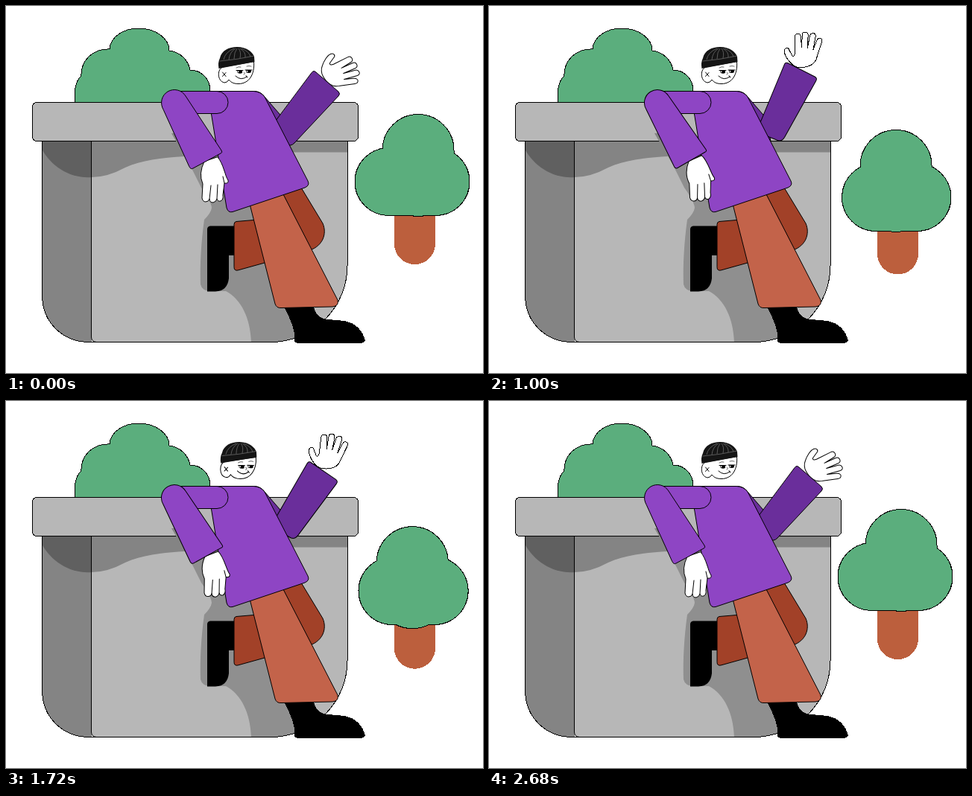
These frames come from a looping animation (640x493 px, 2.72 s). An HTML page:

```html
<!DOCTYPE html>
<html lang="en">
<head>
<meta charset="utf-8">
<title>Waving by the planter</title>
<style>
  html, body { margin: 0; width: 100%; height: 100%; overflow: hidden; background: #fff; }
  svg { display: block; width: 100%; height: 100%; }
  .line { stroke: #000; stroke-width: 1; stroke-linejoin: round; stroke-linecap: round; }
  .crisp { shape-rendering: crispEdges; }
</style>
</head>
<body>
<svg viewBox="0 0 640 493">
  <defs>
    <g id="crown">
      <rect id="leftLobe" width="125" height="90" rx="45"/>
      <rect id="rightLobe" width="125" height="90" rx="45"/>
      <rect id="topLobe" width="95" height="136" rx="47.500"/>
    </g>
    <path id="pot" d="M48.500 181V388C48.500 425 76 451.500 112 451.500H355A103 103 0 0 0 458 348.500V181Z"/>
    <clipPath id="potClip"><use href="#pot"/></clipPath>
  </defs>

  <!-- tree -->
  <g class="crisp">
    <rect id="trunk" x="521" width="55" height="110" rx="27.500" fill="#bc5f3d"/>
    <use href="#crown" fill="#000" stroke="#000" stroke-width="2"/>
    <use href="#crown" fill="#5bae7d"/>
  </g>

  <!-- bush and planter -->
  <path class="line crisp" fill="#5bae7d" d="M92 130V119C92 108 96 98 101 94C100 73 117 57 139 58C140 41 158 30 178 30C200 30 219 43 219 60C233 62 244 71 247 86C262 86 274 98 274 114V130Z"/>
  <g clip-path="url(#potClip)">
    <rect x="48" y="181" width="67" height="271" fill="#848484"/>
    <path fill="#606060" d="M48 181H115V230C86 232 61 216 48 192Z"/>
    <path fill="#b7b7b7" d="M114.500 181H459V452H121Q114.500 452 114.500 445Z"/>
    <path fill="#848484" d="M115 181H459V196.500H300L240 202C208 204 182 207 160 217Q136 230 115 230Z"/>
    <path fill="#8f8f8f" d="M235 190L262 244Q275 262 276 271Q275 278 266 287C262 315 260 350 261 374Q263 383 275 383H295C316 394 328 420 329 452H400L380 350L300 190Z"/>
    <path class="line" fill="none" d="M114.500 181V445Q115 451 121 451.500"/>
  </g>
  <use href="#pot" class="line crisp" fill="none"/>
  <rect class="line crisp" x="35.500" y="129.500" width="437" height="52" rx="6" fill="#b7b7b7"/>
  <path fill="#848484" d="M222 171L232 170L255 216L249 217Z"/>

  <!-- waving arm -->
  <path class="line" fill="#6a2e9b" d="M334 114.500Q342 115 347 122L373 152L378 182L360 155Z"/>
  <g id="arm">
    <g id="hand">
      <path class="line crisp" fill="#fff" d="M-13 10C-17 6 -22 -2 -21.500 -7C-21 -12 -16 -12 -15 -8L-11 0Q-8 1 -7.500 -4L-7 -25C-7 -31 1 -31 1 -26L2 -11L3 -27C3 -33 11 -33 11 -27L9.500 -10L13 -25C14 -31 22 -31 21 -25L17 -7L22 -19C25 -26 31 -22 29 -17L22 2C20 12 10 16 0 16Q-8 16 -13 10Z"/>
    </g>
    <path class="line" fill="#6a2e9b" d="M410.500 89Q413 86 416 89L446 115Q449 118 446 121L387 184Q382 189 377 186L352 168Z"/>
  </g>

  <!-- legs -->
  <g id="foot"><path d="M270 330H299V366Q297 383 281 383.500H270Z"/></g>
  <path d="M274 295.500H310V335H299L292 348H270V300Q270 296 274 295.500Z"/>
  <path class="line" fill="#a24128" d="M306 293Q306 290 309 289.500L350 286L385 282L370 250L396 244L425 292C431 306 425 322 408 328L311 355Q306 356 306 351Z"/>
  <path class="crisp" d="M373 404H413Q416 420 432 421L455 423C470 426 479 437 482 449Q481 452 478 452.500H390Q386 452 387.500 446Q387 430 373 404Z"/>
  <path class="line" fill="#c3634a" d="M326 262L361 400Q363 406 369 405.500L438 404Q447 403 445 395L371 251Z"/>

  <!-- torso and resting arm -->
  <path class="line" fill="#8e45c4" d="M270 114.500H332Q342 115 347 122L405 235Q408 241 401 244L304 276.500Q298 278 296 271L275 142Z"/>
  <path class="line" fill="#8e45c4" d="M226 114.500H283A15 15 0 0 1 283 144.500H226Z"/>
  <g id="restArm">
    <g id="restHand">
      <path class="line" fill="#fff" d="M266 209Q258 225 264 239L263 258Q264 263 268 263Q272 263 273 259Q273 264 278 264Q282 263 283 259Q284 263 288 262Q292 260 291 254L293 238Q299 239 298 234C294 229 292 212 284 203Z"/>
      <path class="line" fill="none" d="M273 259L275 241M283 259L284 240M293 238L291 229"/>
    </g>
    <path class="line" fill="#8e45c4" d="M211 139A17 17 0 0 1 241 121L289 194Q291 197 288 198L251 218Q248 220 246 216Z"/>
  </g>

  <!-- head -->
  <g id="head">
    <path class="line" fill="#fff" d="M291 82C283 84 283 101 293 103Q297 103 299 99C302 103 306 104.500 312 104.500C326 104.500 334 92 332.500 75Z"/>
    <path fill="#151515" d="M285.500 84Q284 76 287 70C289 60 299 55 310 55C323 55 331 62 333 68L333.500 75Z"/>
    <path fill="none" stroke="#777" stroke-width=".7" d="M287 74Q310 72 333 67M292 72Q294 62 306 57M299 72Q300 62 308 57M306 71Q306 62 310 57M314 70Q316 62 312 57M321 69Q322 62 314 57M328 68Q326 61 316 57"/>
    <path class="line" fill="none" d="M290.500 89L295 94.500M295 89.500L290.500 94.500M309 86.500H318M321 86H330M308 94Q315 101 323 95M322 93.500L324 96"/>
    <path class="line" fill="none" stroke-opacity=".6" d="M309 83Q312 81 315 82M323 81Q326 80 329 81M319 89Q322 91 319 92"/>
    <path d="M310 86H317V90Q313 92 310 89ZM322 86H329V89Q326 91 322 89Z"/>
    <path fill="#fff" d="M310.500 87.500h2v1.500h-2ZM322.500 87h2v1.500h-2Z"/>
  </g>
</svg>
<script>
const LOOP = 2720, STEP = 40;

const mix = (from, to, amount) => from + (to - from) * amount;
function ease(t, start, end) {
  const u = Math.min(1, Math.max(0, (t - start) / (end - start)));
  return u * u * (3 - 2 * u);
}
// Goes from 0 to 1, holds, and returns to 0.
const swing = (t, start, top, leave, end) => ease(t, start, top) - ease(t, leave, end);

const part = id => document.getElementById(id);
const pose = (id, transform) => part(id).setAttribute('transform', transform);
function place(id, x, y) {
  part(id).setAttribute('x', x);
  part(id).setAttribute('y', y);
}

function drawPerson(t) {
  const arm = -14 * swing(t, 0, 920, 1280, 2120);
  const wrist = mix(62, 12, swing(t, 280, 1000, 1720, 2120));
  const tap = -17 * swing(t, 320, 640, 640, 960);
  const sway = swing(t, 1400, 2040, 2080, 2680);

  pose('arm', `rotate(${arm} 360 141)`);
  pose('hand', `translate(432.8 90.3) rotate(${wrist}) translate(0 -7.500)`);
  pose('restArm', `rotate(${arm * 0.115} 226 131)`);
  pose('restHand', `rotate(${arm * 0.25} 275 210)`);
  pose('foot', `rotate(${tap} 275 340)`);
  pose('head', `translate(${4.5 * sway} 0) rotate(${2.4 * sway} 311 104)`);
}

// The parts of the tree sink at different times and rise together.
function drawTree(t) {
  const sink = (start, end) => swing(t, start, end, 1500, LOOP - STEP);
  const top = sink(240, 1280), left = sink(280, 1000), right = sink(400, 1000);

  place('topLobe', mix(505.5, 497, top), mix(146, 171.5, top));
  place('leftLobe', mix(468.5, 474, left), mix(191, 212, left));
  place('rightLobe', mix(496.5, 494.5, right), mix(191, 212, right));
  place('trunk', 521, mix(237, 251, sink(240, 1100)));
}

const start = performance.now();
function tick() {
  const t = Math.floor((performance.now() - start) % LOOP / STEP) * STEP;
  drawPerson(t);
  drawTree(t);
  requestAnimationFrame(tick);
}
tick();
</script>
</body>
</html>
```
